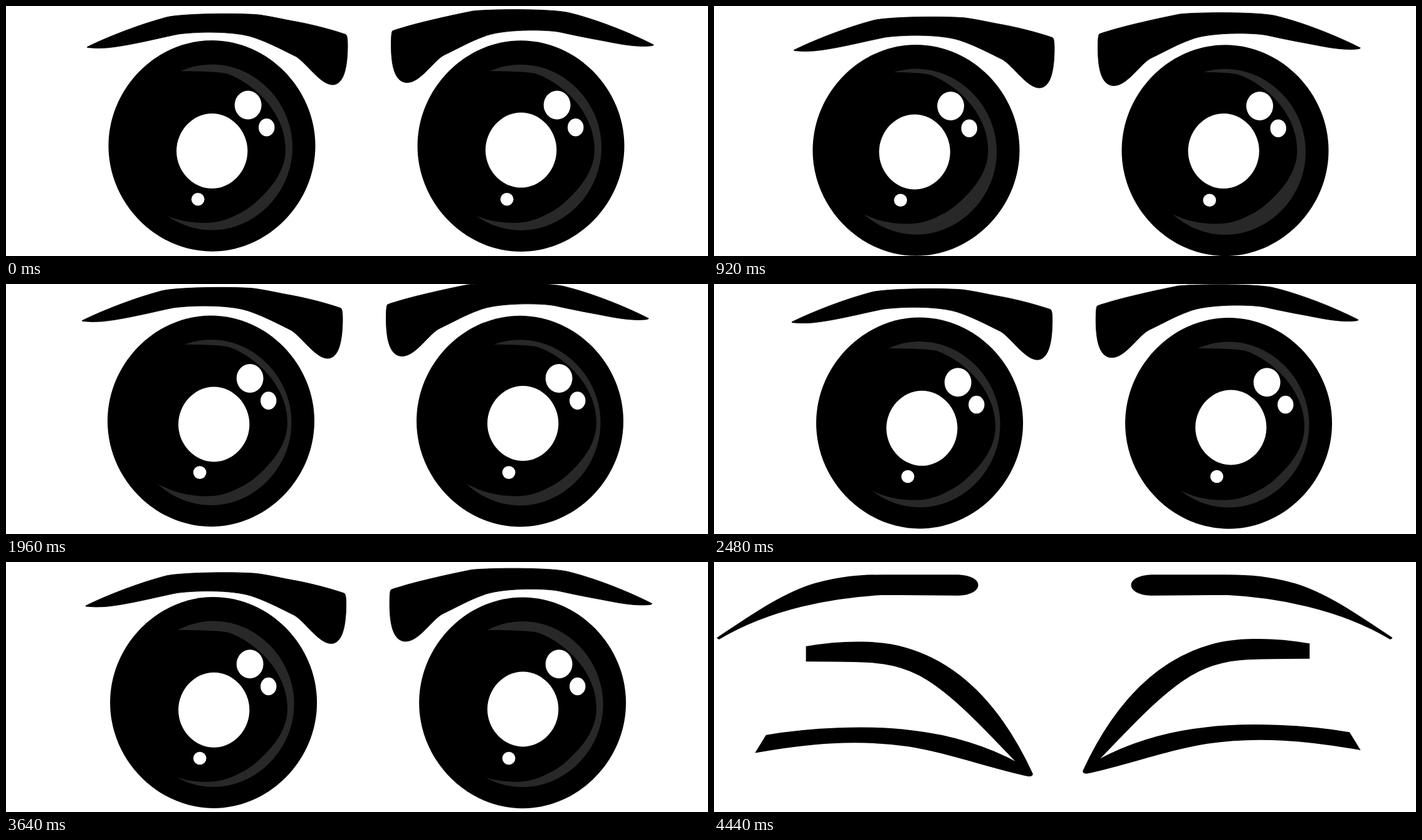
Recreate the animation shown at these times as an HTML page. Size 1120 by 400 pixels, loop 4640 ms.

```html
<!DOCTYPE html>
<html lang="en">
<head>
<meta charset="utf-8">
<title>Eyes</title>
<style>
  html, body { margin: 0; width: 100%; height: 100%; overflow: hidden; background: #fff; }
  svg { display: block; width: 100%; height: 100%; }
  .brow { stroke: #000; stroke-width: .9; stroke-linejoin: round; }
  #closed { stroke: #000; stroke-width: 1.6; }
</style>
</head>
<body>
<svg viewBox="0 0 1120 400">
  <defs>
    <!-- Unit circle with slightly flattened diagonals. -->
    <path id="round" d="M0 -1C.542 -1 1 -.542 1 0S.542 1 0 1 -1 .542 -1 0 -.542 -1 0 -1Z"/>
    <g id="iris">
      <use href="#round" transform="translate(328.5 223.8) scale(165 168.9)"/>
      <use href="#round" transform="translate(328.5 226) scale(128.5 132.6)" fill="#282828"/>
    </g>
    <!-- The dark core follows the pupil and leaves a grey crescent of the iris. -->
    <path id="core" d="M235 103.5L270 104C300 104.5 340 104.5 353 108.5C375 116 400 134 415 152C435 175 446 202 446 230C446 255 433 280 410 303C398 315 386 326 370 333C352 343 335 347 318 347C290 347 268 341 252 333.5C243 329.5 232 325 222 318L190 290V165Z"/>
    <use id="pupil" href="#round" transform="translate(328.7 232) scale(56.7 60)" fill="#fff"/>
    <g id="glints" fill="#fff">
      <ellipse cx="386.2" cy="158.5" rx="21.4" ry="23"/>
      <ellipse cx="415.8" cy="194.2" rx="12.7" ry="14.3"/>
      <ellipse cx="306.2" cy="309.2" rx="10.4" ry="10.3"/>
    </g>
    <path id="closedBrow" stroke-linejoin="round" d="M5.5 121.5C60 85 110 50 160 35C200 24 230 21 270 21H390C431 23 431 51 390 53L270 52C190 56 90 74 8 123Z"/>
    <g id="closedLids">
      <path d="M147.5 135.5C210 124.5 270 126.5 305 137.5C395 163 460 235 508 339Q508 343 500 342L484 321.5C430 265 385 216 340 188C305 166 270 160 230 159.5C200 158.5 175 158.5 147.5 158.5Z"/>
      <path d="M83.5 277.5C150 266 245 261 315 270C380 277 440 297 484 321.5L507 341Q505 343 495 341C430 326 370 304 310 294.5C230 282.5 150 289.5 67 304.5Z"/>
    </g>
  </defs>

  <g id="open">
    <g id="irises">
      <use href="#iris"/>
      <use href="#iris" x="493" y=".3"/>
    </g>
    <g id="pupils">
      <use href="#core"/>
      <use href="#core" x="493"/>
      <use href="#pupil"/>
      <use href="#pupil" x="493" y="-1.4"/>
      <use href="#glints"/>
      <use href="#glints" x="493"/>
    </g>
    <g id="brows" class="brow">
      <path d="M129.5 65.5C165 48 215 29 256 18C280 12 370 11 403 14C425 17 445 22 463 25C490 30 520 38 542 45.5Q545 47 545 62C545 95 540 126 521 126C502 126 480 92 463 81C445 72 420 59 400 52C370 40 310 40.5 275 45C245 51 195 64 160 67Q145 68 130 66.5Z"/>
      <path d="M1032 61.5C1000 45 945 22 897 10.5C870 4.5 780 4.5 745 8C715 14 660 26 630 35.5C626 36.5 620 38.5 616.5 40Q614.5 42 614.5 62C614.5 95 620 122.5 640 122.5C662 122.5 683 86 700 78C725 66 740 57 762 49C790 37 860 37 885 42C920 50 945 54 970 59C990 63 1015 66 1031 63.5Q1035 62 1032 61.5Z"/>
    </g>
  </g>

  <g id="closed">
    <use href="#closedBrow"/>
    <use href="#closedBrow" transform="translate(1087) scale(-1 1)"/>
    <use href="#closedLids"/>
    <use href="#closedLids" transform="translate(1097 -4.5) scale(-1 1)"/>
  </g>
</svg>
<script>
const LOOP = 4640, BLINK = 4440, STEP = 40;
const layers = ['brows', 'irises', 'pupils'];
const byId = id => document.getElementById(id);

// The parts drift through a few key poses and come back to rest at the blink.
const rest = { brows: [0, 0], irises: [0, 0], pupils: [0, 0] };
const poses = [
  { at: 0, ...rest },
  { at: 920, brows: [-2, 5], irises: [-6, 7.1], pupils: [-8.6, 1.5] },
  { at: 1560, brows: [-6, -1.3], irises: [-4.5, 2], pupils: [-9, -6.6] },
  { at: 1960, brows: [-8, -7], irises: [-1.5, -4.5], pupils: [3, -7.6] },
  { at: 2960, brows: [-2.7, -2.8], irises: [0.5, 1.7], pupils: [3, 4.8] },
  { at: 3380, brows: [-2.6, 1.8], irises: [1.6, 5.8], pupils: [3, 4.8] },
  { at: 3640, brows: [-2.4, 4.5], irises: [2.6, 1.2], pupils: [3, 4.8] },
  { at: BLINK, ...rest }
];

function pose(t) {
  const next = poses.findIndex(p => p.at > t);
  const a = poses[next - 1], b = poses[next];
  const k = (t - a.at) / (b.at - a.at);
  for (const id of layers) {
    const shift = a[id].map((from, axis) => from + (b[id][axis] - from) * k);
    byId(id).setAttribute('transform', `translate(${shift})`);
  }
}

const start = performance.now();
function draw(now) {
  const t = Math.floor(Math.max(0, now - start) % LOOP / STEP) * STEP;
  const blinking = t >= BLINK;
  byId('open').style.display = blinking ? 'none' : '';
  byId('closed').style.display = blinking ? '' : 'none';
  if (!blinking) pose(t);
  requestAnimationFrame(draw);
}
draw(start);
</script>
</body>
</html>
```
